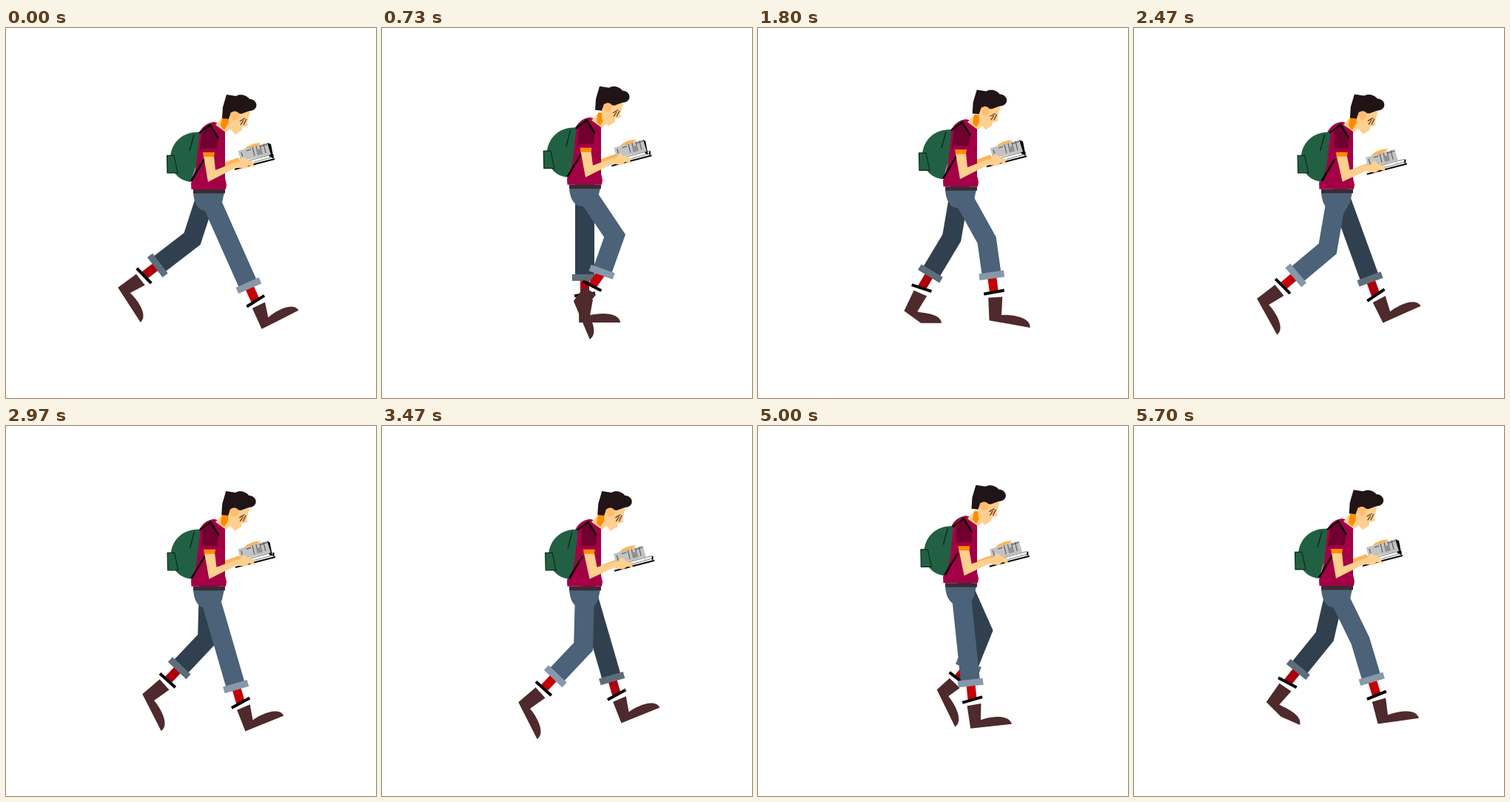
An HTML page with a canvas for the animation above (5.73 s loop, 500 by 500 pixels).

```html
<!DOCTYPE html>
<html lang="en">
<head>
<meta charset="utf-8">
<title>Walking reader</title>
<style>
html, body { margin: 0; width: 100%; height: 100%; overflow: hidden; background: #fff; }
canvas { display: block; width: 500px; height: 500px; }
</style>
</head>
<body>
<canvas id="stage"></canvas>
<script>
const LOOP = 5730, CYCLE = 24;
const canvas = document.getElementById('stage');
const ctx = canvas.getContext('2d');
const ratio = window.devicePixelRatio || 1;
canvas.width = canvas.height = 500 * ratio;

const SKIN = '#ffcf8e', TAN = '#ffb457', ORANGE = '#ff8a00', SHIRT = '#a30046',
  SLEEVE = '#70002f', HAIR = '#211416', BLACK = '#050505', PACK = '#226043',
  PACK_EDGE = '#0b2b1d', BOOT = '#4e2a2d';
const NEAR = { pants: '#4b6278', cuff: '#8698aa', sock: '#c40008' };
const FAR = { pants: '#31404e', cuff: '#5d6d7a', sock: '#aa000c' };

// step in the cycle, thigh, shin, shin length, ankle band, sole, toe bend (degrees)
const GAIT = [
  [0, 24, 24, 60, -32, -27, 0],
  [1, 20, 20, 59, -34, -24, 0],
  [2, 16.2, 16.2, 59, -29, -22, 0],
  [5, 6, 6, 54, -16, -6, 0],
  [6, 0, 0, 55, -8, 0, 0],
  [9, -9.7, -31, 56, 18, 36, 36],
  [10, -13, -39, 57, 28, 45, 21],
  [12, -18, -52.5, 59, 46, 57, 0],
  [13, -9.8, -50, 56, 45, 61, 0],
  [14, -1.5, -43.5, 55, 42, 63, 0],
  [17, 24, -22, 51, 38, 64, 0],
  [18, 34, -19.5, 52, 27, 67, 0],
  [21, 29, 8, 48, -10, 10, 0],
  [22, 26, 16.7, 54, -22, -8, 0]
];

const rad = d => d * Math.PI / 180;
const wave = (p, period) => Math.cos(2 * Math.PI * p / period);

function key(i) {
  const n = GAIT.length, turn = Math.floor(i / n);
  const [p, ...v] = GAIT[i - turn * n];
  return { p: p + turn * CYCLE, v };
}

// smooth cyclic interpolation through the gait table
function gait(p) {
  p = (p % CYCLE + CYCLE) % CYCLE;
  let i = GAIT.length - 1;
  while (GAIT[i][0] > p) i--;
  const [a, b, c, d] = [key(i - 1), key(i), key(i + 1), key(i + 2)];
  const h = c.p - b.p, u = (p - b.p) / h, w = 1 - u;
  return b.v.map((v, k) => {
    const m = (c.v[k] - a.v[k]) / (c.p - a.p), n = (d.v[k] - v) / (d.p - b.p);
    return (1 + 2 * u) * w * w * v + u * w * w * h * m
      + u * u * (3 - 2 * u) * c.v[k] - u * u * w * h * n;
  });
}

const reach = ([x, y], deg, d) => [x + Math.sin(rad(deg)) * d, y + Math.cos(rad(deg)) * d];
const local = ([ox, oy], deg, x, y) => {
  const c = Math.cos(rad(deg)), s = Math.sin(rad(deg));
  return [ox + x * c - y * s, oy + x * s + y * c];
};

function fill(color, d) {
  ctx.fillStyle = color;
  ctx.fill(new Path2D(d));
}
function stroke(color, width, d) {
  ctx.strokeStyle = color;
  ctx.lineWidth = width;
  ctx.stroke(new Path2D(d));
}
const join = (...pts) => 'M' + pts.join('L');

function group(x, y, draw) {
  ctx.save();
  ctx.translate(x, y);
  draw();
  ctx.restore();
}

function leg(p, hipY, tone) {
  const [thigh, shin, length, band, sole, bendRaw] = gait(p);
  const tip = sole - Math.max(0, bendRaw);
  // the foot tucks up while a bent knee swings forward
  const tuck = Math.max(0, Math.min(thigh, -shin));
  const hip = [274, hipY], knee = reach(hip, thigh, 72.5), cuff = reach(knee, shin, length);
  const ankle = reach(cuff, shin - 0.8 * tuck, 23);
  const heel = local(ankle, band, -13, 36.5 - 0.35 * tuck);
  const ball = local(heel, sole, 28, 0);
  const toe = (x, y) => local(ball, tip, x, y);

  stroke(tone.sock, 12, join(cuff, ankle));
  stroke(BLACK, 4, join(local(ankle, band, -14, 0), local(ankle, band, 14, 0)));
  fill(BOOT, join(heel, local(ankle, band, -9, 6), local(ankle, band, 10, 8),
    local(heel, sole, 15, -10))
    + 'C' + [toe(-2, -13), toe(26, -15), toe(28, 0)].join(' ')
    + 'L' + ball + 'Z');
  stroke(tone.pants, 26, join(hip, knee, cuff));
  stroke(tone.cuff, 9, join(local(cuff, -shin, -17, 0), local(cuff, -shin, 17, 0)));
}

function torso() {
  fill(SHIRT, 'M260 144Q266 129 281 127L285 128L296 138V203L298 212L297 218H250.5L250 210L256 190Z');
  fill('#3c2a33', 'M253 218H296V223.5H253Z');
  fill(SKIN, 'M283 131L294 119L307 133L297 141Z');
  fill(ORANGE, 'M292 121L301 121V128L295 138L290 132Z');
}

function backpack() {
  fill(PACK, 'M262 141C238 139 222 157 222 176C222 195 235 207 250 208L257 185Z');
  stroke(PACK_EDGE, 1.4, 'M254 144L248 166');
  const pocket = 'M217.5 172.5H227L232 196H218Z';
  fill(PACK, pocket);
  stroke(PACK_EDGE, 1.2, pocket);
  stroke(BLACK, 2.6, 'M268 177L250 207');
}

function sleeve(w) {
  fill(SLEEVE, join([265 + 6 * w, 141], [276 + 3.5 * w, 132], [287 + 4 * w, 148],
    [284 + 6 * w, 165], [262 + 9 * w, 165]) + 'Z');
  group(3.5 * w, 0, () => stroke(BLACK, 2.6, 'M261 142L276 131L287 149'));
  group(7 * w, 0, () => {
    fill(SHIRT, 'M263 163H284L282 169H266Z');
    fill(ORANGE, 'M266 168H282L281 174H267Z');
  });
}

function farArm(w) {
  group(6 * w, 7 * w, () => fill(TAN, 'M292 183L314 175L317 180L293 190Z'));
  group(-w, 8.5 * w, () => fill(TAN, 'M318 168L326 160L334 156.5L344 155L341 158.5L336 161L340 165Z'));
}

function book(w) {
  group(6 * w, 7 * w, () => {
    fill('#fff', 'M312 186L357 173L361 176L311 190Z');
    stroke('#777', 1, 'M318 182L359 171M322 185L360 174.5');
    stroke(BLACK, 2, 'M309 191L363 177M360.5 171V176');
  });
  // the dark cover closes behind the pages as the book tips
  const edge = 5 * Math.max(0, 1 - 1.6 * w);
  group(-w, 9.5 * w, () => {
    fill(BLACK, join([353, 155], [353 + edge, 157], [356.5 + edge, 175], [356, 174]) + 'Z');
    fill('#c2c2c2', 'M314 166L353 155L358 171L317 180Z');
    for (let i = 0; i < 4; i++) {
      const x = 333 + i * 5, y = 163 - i * 1.4;
      stroke('#565656', 1.1, `M${x} ${y - 2}l3 12`);
    }
    fill('#909090', 'M338 165L345 163L347 170L340 172Z');
    stroke('#565656', 1.1, 'M318 168L320 175M325 166L331 164M344 160L353 157');
  });
}

function nearArm(w) {
  const s = 7 * w, e = 9 * w, hx = 6 * w, hy = 7 * w;
  fill(SKIN, join([267 + s, 173], [281 + s, 173], [283 + e, 192],
    [311 + hx, 181 + hy / 2], [314 + hx, 187 + hy / 2], [273 + e, 208]) + 'Z');
  group(4 * w, 6 * w, () =>
    fill(SKIN, 'M307 184L317 179L319 174L323 175L327 179L336 181L334 184L337 188L328 186L323 190L313 189Z'));
}

function head() {
  fill(SKIN, 'M301 113L327 108L330 113L326 127L327 132L319 134L319 138L310 144L301 134Z');
  fill(HAIR, 'M292 122L293 107L298 90L311 92C315 89 325 90 329 96C336 96 340 102 338 107'
    + 'C336 111 332 112 329 112L318 116L304 114L301 123Z');
  fill('#ffbd70', 'M303 119C303 111 313 111 315 116C316 122 311 125 307 125Z');
  stroke('#5a3527', 1.2, 'M316 126L323 122M317 131L321 125M321 131L325 123');
}

function draw(step) {
  const p = step % CYCLE;
  const lift = wave(p - 0.3, 12);
  const bob = 3.2 * (lift - 1);
  const nod = (lift - 1) / 2;
  const swing = Math.max(0, Math.min(1, 0.5 - 0.62 * wave(p + 1.8, CYCLE)));
  const hipY = 227 + bob;

  ctx.setTransform(ratio, 0, 0, ratio, 0, 0);
  ctx.fillStyle = '#fff';
  ctx.fillRect(0, 0, 500, 500);

  leg(p + 12, hipY - 11, FAR);
  leg(p, hipY, NEAR);
  group(0, bob, () => {
    fill(NEAR.pants, 'M253 222H295L292 236L284 250L264 246Q254 240 253 222Z');
    farArm(swing);
    torso();
    group(3.8 * swing, 0, backpack);
    book(swing);
    nearArm(swing);
    sleeve(swing);
    group(4 * nod, 5 * nod, head);
  });
}

// 25 poses a second shown on a 30 Hz clock: every fifth pose is held twice as long
function stepAt(t) {
  const slot = Math.floor((t % 200 + 4) * 30 / 1000);
  return 5 * Math.floor(t / 200) + Math.max(0, slot - 1);
}

const start = performance.now();
function tick() {
  draw(stepAt((performance.now() - start) % LOOP));
  requestAnimationFrame(tick);
}
tick();
</script>
</body>
</html>
```
